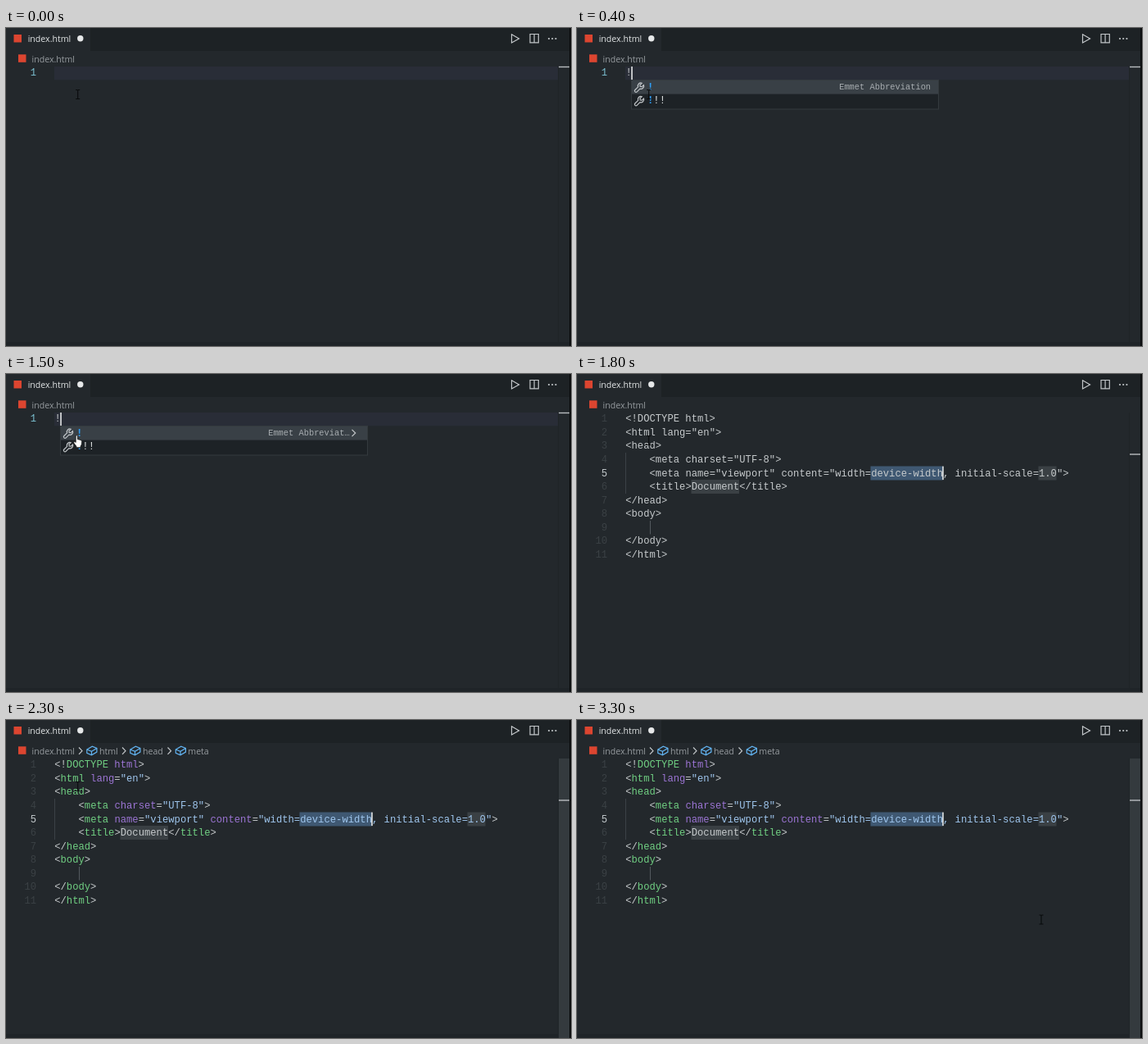
An HTML page for the animation above (3.4 s loop, 690 px wide and 388 px high).

```html
<!DOCTYPE html>
<html lang="en">
<head>
<meta charset="UTF-8">
<title>Editor abbreviation</title>
<style>
  html, body { margin: 0; width: 100%; height: 100%; overflow: hidden; background: #23282c; }
  svg { display: block; width: 690px; height: 388px; }
  text { white-space: pre; }
  .ui { font: 10.6px "Open Sans", sans-serif; fill: #969b9f; }
  .code { font: 12.2px "Liberation Mono", monospace; fill: #c6cacc; }
  .detail { font: 10.37px "Liberation Mono", monospace; fill: #a7acb0; }
  .num { fill: #3b4145; text-anchor: end; }
  .num.now { fill: #c3c9cc; }
  .match { fill: #2f9df4; font-weight: bold; }
  .colored .tag { fill: #70cf82; }
  .colored .attr { fill: #9b74d3; }
  .colored .str { fill: #9fc6ee; }
  .line { fill: none; stroke: #c2c6c9; stroke-width: 1.2; }
  .mark { stroke: #b9bdc0; stroke-width: 1.4; }
  .logo { fill: #dc4530; }
</style>
</head>
<body>
<svg viewBox="0 0 690 388">
  <defs>
    <path id="wrench" class="line" d="M9.2 1.2A3.6 3.6 0 0 0 4.6 5.8L.9 9.5a1.6 1.6 0 0 0 2.3 2.3L6.9 8.1A3.6 3.6 0 0 0 11.5 3.6L9.3 5.6 7.1 5.4 7 3.3z"/>
    <g id="crumb">
      <path class="line" d="M0 33.5l4 4.2-4 4.2"/>
      <path class="line" style="stroke:#62b3f1" d="M9.8 36l6.5-3.8 5.6 2.3v4.6l-6.4 3.7-5.7-2.4zM9.8 36l5.7 2.3 6.4-3.8M15.5 38.3v4.5"/>
    </g>
  </defs>

  <rect width="690" height="388" fill="#23282c"/>
  <rect x="103" width="587" height="28" fill="#1d2225"/>
  <rect y="383" width="690" height="5" fill="#1f2428"/>
  <path d="M674.5 47V383" stroke="#1f2427"/>

  <rect class="logo" x="9.5" y="8" width="9.5" height="9.5"/>
  <text class="ui" x="26.7" y="16.8" style="fill:#e2e5e6">index.html</text>
  <circle cx="90.8" cy="12.8" r="3.7" fill="#e6e8e9"/>
  <path class="line" d="M617.5 7.8V18l9-5.1zM640 7.5h10.3v10.3H640zM645.1 7.5v10.3"/>
  <g fill="#c2c6c9">
    <circle cx="663" cy="13" r="1.1"/><circle cx="667.2" cy="13" r="1.1"/><circle cx="671.4" cy="13" r="1.1"/>
  </g>
  <rect class="logo" x="15" y="32.3" width="9.5" height="9.5"/>
  <text class="ui" x="31.5" y="41.7">index.html</text>
  <g data-on="2300-3400">
    <use href="#crumb" x="89"/><use href="#crumb" x="142"/><use href="#crumb" x="197.5"/>
    <text class="ui" y="41.7"><tspan x="114">html</tspan><tspan x="167">head</tspan><tspan x="222.3">meta</tspan></text>
  </g>

  <g data-on="0-1800">
    <rect x="59" y="47" width="615" height="16.3" fill="#292d37"/>
    <text class="code num" x="37.2" y="58.4" style="fill:#7cc0d0">1</text>
    <path class="mark" d="M675 47.5H688"/>
  </g>
  <text class="code" x="59.4" y="58.4" data-on="300-1800">!</text>
  <rect x="66.3" y="47" width="1.5" height="16.3" fill="#f0f2f3" data-on="300-900 1500-1800"/>

  <g data-on="400-1800">
    <rect x="66.5" y="63.5" width="375" height="35.5" fill="#1d2226" stroke="#343a3e"/>
    <rect x="67" y="64" width="374" height="16.6" fill="#394046"/>
    <use href="#wrench" x="70" y="66"/><use href="#wrench" x="70" y="82.5"/>
    <text class="code match" x="86" y="75.6">!</text>
    <text class="code" x="86" y="92.2" style="fill:#e4e7e8"><tspan class="match">!</tspan>!!</text>
    <text class="detail" x="320.2" y="75" data-on="400-800">Emmet Abbreviation</text>
    <g data-on="800-1800">
      <text class="detail" x="320.2" y="75">Emmet Abbreviat…</text>
      <path class="line" d="M422.5 67.8l4.2 4.2-4.2 4.2"/>
    </g>
  </g>

  <g data-on="1800-3400">
    <rect x="675" y="47" width="13" height="341" fill="#343a3e" data-on="1900-3400"/>
    <path class="mark" d="M675 98H688"/>
    <path d="M59.5 96V146" stroke="#3b4146"/>
    <path d="M89.5 179V195.5" stroke="#53595e"/>
    <rect x="358.5" y="112.5" width="88" height="17" fill="#3f5872"/>
    <path d="M139.5 129h58.5v17h-58.5zM563.5 112.5h22v17h-22z" fill="#3a4044"/>
    <g id="doc" class="code"></g>
    <rect x="446.2" y="112.6" width="1.5" height="16.5" fill="#f0f2f3" data-on="1800-2400 3000-3400"/>
  </g>

  <rect x="688" width="2" height="388" fill="#0b0d0e"/>
  <path id="beam" d="M-2.5-5.5H-.8L0-4.9.8-5.5H2.5M0-5V5M-2.5 5.5H-.8L0 4.9.8 5.5H2.5" fill="none" stroke="#090b0c" stroke-width="1.1" data-on="0-800 1800-3400"/>
  <path d="M85.2 75.4q1.3-1.2 2.2.3v4l1.7.2 1.5.5 1.3.6q.9.5.8 1.8l-.4 3.2-1.2 2.2v1.5h-5.2v-1.4l-2.7-3.6q-1-1.6.1-2.1 1-.3 1.9.9z" fill="#fff" stroke="#101314" stroke-width=".8" data-on="800-1800"/>
</svg>
<script>
  const LOOP = 3400, LINE = 16.53, INDENT = 29.3;
  const source = [
    '<!DOCTYPE html>', '<html lang="en">', '<head>',
    '    <meta charset="UTF-8">',
    '    <meta name="viewport" content="width=device-width, initial-scale=1.0">',
    '    <title>Document</title>',
    '</head>', '<body>', '', '</body>', '</html>'
  ];
  const doc = document.getElementById('doc');
  const beam = document.getElementById('beam');

  function add(parent, name, attrs, content = '') {
    const node = document.createElementNS('http://www.w3.org/2000/svg', name);
    for (const key in attrs) node.setAttribute(key, attrs[key]);
    node.textContent = content;
    return parent.appendChild(node);
  }

  source.forEach((line, i) => {
    const y = 58.4 + i * LINE;
    add(doc, 'text', { class: i === 4 ? 'num now' : 'num', x: 37.2, y }, i + 1);
    const row = add(doc, 'text', { x: 59.2 + (line.startsWith(' ') ? INDENT : 0), y });
    const tokens = line.trim().matchAll(/(<[!\/]?)(\w+)|("[^"]*")|( \w+)|([^<" ]+)/g);
    for (const [, open, tag, str, attr, rest] of tokens) {
      if (open) add(row, 'tspan', {}, open);
      const kind = tag ? 'tag' : str ? 'str' : attr ? 'attr' : 'rest';
      add(row, 'tspan', { class: kind }, tag || str || attr || rest);
    }
  });

  const timed = [...document.querySelectorAll('[data-on]')].map(node => ({
    node, spans: node.dataset.on.split(' ').map(span => span.split('-').map(Number))
  }));

  function pointer(t) {
    if (t < 2500) return [87.7, 81];
    if (t < 3000) return [103, 113];
    return t < 3300 ? [544.5, 233] : [567, 243.5];
  }

  function draw(now) {
    const t = now % LOOP;
    for (const { node, spans } of timed) {
      node.style.display = spans.some(([from, to]) => t >= from && t < to) ? '' : 'none';
    }
    doc.classList.toggle('colored', t >= 1900);
    beam.setAttribute('transform', `translate(${pointer(t)})`);
    requestAnimationFrame(draw);
  }
  draw(0);
</script>
</body>
</html>
```
